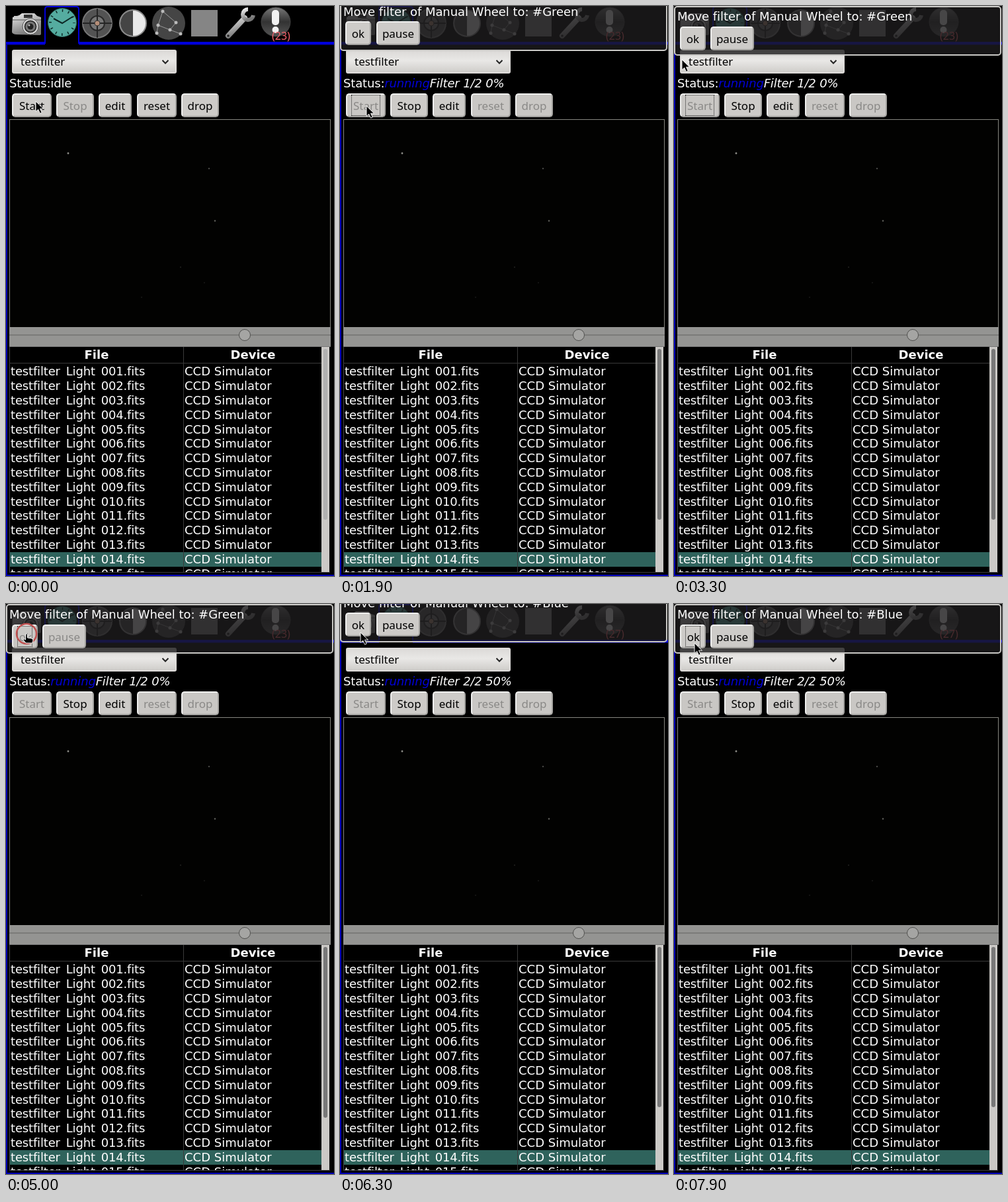
Animation of 496x861 px, one loop 8000 ms. Source, as an HTML page:

```html
<!DOCTYPE html>
<html lang="en">
<head>
<meta charset="utf-8">
<title>Filter sequence</title>
<style>
html, body { margin: 0; width: 100%; height: 100%; overflow: hidden; background: #000; }
#stage { position: relative; width: 496px; height: 861px; overflow: hidden; background: #000; color: #fff;
  font: 18px/22px "DejaVu Sans", sans-serif; white-space: pre; }
#stage div, svg { position: absolute; box-sizing: border-box; }
svg { left: 0; top: 0; overflow: visible; }
.btn, #combo { font: 17px/22px "Noto Sans", sans-serif; color: #000; }
.btn { display: flex; align-items: center; justify-content: center; padding-top: 2px; height: 36px;
  background: #cdcbc8; border: 2px solid; border-color: #efefee #a4a3a0 #a4a3a0 #efefee; border-radius: 5px; }
.btn.off { color: #8a8987; background: #c9c7c4; }
.btn.focus::after { content: ""; position: absolute; inset: 0 6px; border: 1px dotted #222; }
#combo { left: 9px; top: 66px; width: 249px; height: 36px; padding: 5px 11px; border: 2px solid #dddbd9;
  border-radius: 3px; background: linear-gradient(#dcdad8, #e9e8e6 45%, #cfcdca); }
#combo.hover { background: #efeeec; }
#frame { left: 5px; top: 171px; width: 486px; height: 315px; border: 1px solid #85857f; background: #020201; }
#slider { left: 5px; top: 485px; width: 486px; height: 30px; background: #949492; border-bottom: 1px solid #777; }
#slider::before { content: ""; position: absolute; left: 0; right: 0; top: 11px; height: 2px; background: #7b7b79; }
#knob { left: 347px; top: 3px; width: 18px; height: 18px; border-radius: 50%; background: #a5a5a3; border: 1px solid #50504e; }
#table { left: 5px; top: 515px; width: 472px; height: 340px; overflow: hidden; border-left: 1px solid #444; }
.head { top: 1px; font-weight: bold; text-align: center; }
.row { left: 0; width: 472px; height: 22px; }
.row.sel { background: #2f635c; }
.row i { visibility: hidden; font-style: normal; }
.row span { padding-left: 1px; }
.row span, #status { letter-spacing: -.16px; }
.row div { left: 264px; top: 0; }
#bar { left: 477px; top: 515px; width: 12px; height: 340px; background: #cbc9c6; }
#thumb { left: 3px; top: 3px; width: 6px; border-radius: 3px; }
#status { left: 5px; top: 106px; }
#status i { color: #0000d8; }
#dialog { left: 0; top: 0; width: 495px; height: 75px; border: 2px solid #c9c8c5; border-radius: 5px; background: rgba(29,28,29,.8); }
#msg { left: 3px; top: 3px; letter-spacing: -.05px; }
#badge { left: 402px; top: 34px; font: 500 16px/22px "Noto Sans", sans-serif; color: #f5626c; }
</style>
</head>
<body>
<div id="stage">
  <svg width="496" height="861">
    <defs>
      <linearGradient id="silver" x2=".4" y2="1"><stop stop-color="#eee"/><stop offset="1" stop-color="#777"/></linearGradient>
      <linearGradient id="dome" x2="0" y2="1"><stop stop-color="#777"/><stop offset=".5" stop-color="#333"/><stop offset="1" stop-color="#555"/></linearGradient>
      <linearGradient id="band" x2="0" y2="1"><stop stop-color="#00a"/><stop offset=".45" stop-color="#00f"/><stop offset="1" stop-color="#006"/></linearGradient>
    </defs>
    <rect id="hover" x="5" y="0" width="53" height="56" rx="4" fill="#1b1930" stroke="#35324c"/>
    <path d="M0 54H59V59H0ZM110 54H496V59H110Z" fill="url(#band)"/>
    <path d="M59 57V5Q59 1 63 1H106Q110 1 110 5V57" fill="none" stroke="#0000d8" stroke-width="2"/>
    <path d="M1 57V861M0 860H496" stroke="#0000b4" stroke-width="2"/>
    <path d="M10 17L20 14 24 11H43L47 15 53 17V42Q53 44 50 44L15 43Q9 42 9 39Z" fill="url(#silver)"/>
    <path d="M10 21H53" stroke="#555"/>
    <rect x="27" y="13" width="13" height="5" fill="#333"/>
    <rect x="12" y="15" width="7" height="3" fill="#ccc"/>
    <circle cx="37" cy="31" r="12" fill="#ddd" stroke="#555"/>
    <circle cx="37" cy="31" r="8.5" fill="#777" stroke="#333" stroke-width="2"/>
    <circle cx="37" cy="31" r="4.5" fill="#222"/><circle cx="35" cy="29" r="1.5" fill="#bbb"/>
    <circle cx="85" cy="25" r="21.5" fill="#55aca0" stroke="#28665e"/>
    <circle cx="85" cy="25" r="18" fill="none" stroke="#0c2724" stroke-width="4" stroke-dasharray="1.5 7.925" stroke-dashoffset=".75"/>
    <path d="M72 19L85 26 101 16" fill="none" stroke="#0c2724" stroke-width="2"/>
    <circle cx="138" cy="26" r="22" fill="#535353" stroke="#777" stroke-width="2"/>
    <circle cx="138" cy="26" r="11" fill="#767676" stroke="#292929" stroke-width="2"/>
    <path d="M138 4V48M116 26H160" stroke="#242424" stroke-width="2"/>
    <circle cx="138" cy="26" r="4" fill="#b58e78" stroke="#333"/>
    <circle cx="192" cy="26" r="20" fill="#e9e9e9" stroke="#888" stroke-width="2"/>
    <path d="M192 7A19 19 0 0 0 192 45Z" fill="#454545"/>
    <circle cx="246" cy="26" r="25" fill="#454545"/>
    <g fill="none" stroke="#999">
      <path d="M237 8L230 29 248 36 257 25 237 8M248 36L264 42M230 29L228 41"/>
      <path d="M237 8h0M230 29h0M248 36h0M257 25h0M264 42h0M228 41h0" stroke="#bbb" stroke-width="5" stroke-linecap="round"/>
    </g>
    <rect x="280" y="6" width="40" height="40" fill="#858585"/>
    <g fill="none" stroke="url(#silver)">
      <path d="M336 45L361 18" stroke-width="8" stroke-linecap="round"/>
      <path d="M366 5A8 8 0 1 0 374 14" stroke-width="6"/>
    </g>
    <circle cx="336" cy="45" r="1.8" fill="#222"/>
    <circle cx="408" cy="24" r="22" fill="url(#dome)" stroke="#444"/>
    <rect x="402" y="6" width="11" height="23" rx="5" fill="#f2f2f2"/><circle cx="407.5" cy="36" r="5" fill="#f2f2f2"/>
  </svg>
  <div id="badge"></div>
  <div id="combo">testfilter</div>
  <svg width="496" height="861"><path d="M236.5 82L241 86.5 245.5 82" fill="none" stroke="#222" stroke-width="2"/></svg>
  <div id="status"></div>
  <div class="btn" id="start" style="left:9px;top:132px;width:60px">Start</div>
  <div class="btn" id="stop" style="left:76px;top:132px;width:57px">Stop</div>
  <div class="btn" style="left:140px;top:132px;width:50px">edit</div>
  <div class="btn" id="reset" style="left:198px;top:132px;width:60px">reset</div>
  <div class="btn" id="drop" style="left:265px;top:132px;width:57px">drop</div>
  <div id="frame"></div>
  <svg width="496" height="861" fill="#8a8a84">
    <circle cx="94" cy="222.5" r="1.4"/><circle cx="307" cy="245.5" r="1" opacity=".75"/>
    <circle cx="316" cy="324.5" r="1.2" opacity=".7"/><circle cx="264" cy="394.5" r="1" opacity=".25"/>
    <circle cx="300" cy="418" r="1" opacity=".18"/><circle cx="205" cy="440" r="1" opacity=".18"/>
  </svg>
  <div id="slider"><div id="knob"></div></div>
  <div id="table">
    <div class="head" style="left:0;width:262px">File</div>
    <div class="head" style="left:263px;width:209px">Device</div>
  </div>
  <svg width="496" height="861"><path d="M5 539.5H477M268.5 515V855M5 855.5H490" stroke="#3a3a3a"/></svg>
  <div id="bar"><div id="thumb"></div></div>
  <div id="dialog">
    <div id="msg"></div>
    <div class="btn" id="ok" style="left:7px;top:29px;width:39px">ok</div>
    <div class="btn" id="pause" style="left:53px;top:29px;width:66px">pause</div>
  </div>
  <svg width="496" height="861">
    <circle id="ring" cx="31" cy="45" r="15" fill="none" stroke="#c0504f" stroke-width="2.5"/>
    <g id="cursor" fill="#000" stroke="#fff" stroke-linejoin="round">
      <path id="arrow" d="M0 0V15.5L3.7 12.2 6.5 18.3 9.2 17 6.5 11.2H11.5Z" stroke-width=".9"/>
      <path id="hand" d="M-1 0Q1-1 1.5 1V6L8 7Q10 7.5 10 10L9 14H-1L-5 9Q-5 7-3 8L-1.5 9Z"/>
    </g>
  </svg>
</div>
<script>
const $ = id => document.getElementById(id);
const LOOP = 8000, HIDDEN = -76;

for (let i = 0; i < 15; i++) {
  const row = document.createElement('div');
  row.className = i === 13 ? 'row sel' : 'row';
  row.style.top = 26 + Math.ceil(i * 21.8) + 'px';
  row.innerHTML = `<span>testfilter<i>_</i>Light<i>_</i>${String(i + 1).padStart(3, '0')}.fits</span><div>CCD Simulator</div>`;
  $('table').append(row);
}

// pointer tip: time, x, y
const path = [
  [0, 45, 144], [400, 44, 150], [500, 43, 157], [600, 42, 161], [700, 41, 158], [800, 40, 154], [900, 40, 151],
  [2300, 38, 147], [2400, 36, 139], [3100, 26, 120], [3200, 16, 100], [3300, 12, 81], [3400, 13, 67],
  [3600, 18, 58], [3700, 26, 48], [3800, 31, 43], [6900, 31, 47], [7000, 31, 53], [7100, 31, 60],
  [7200, 31, 62], [7700, 31, 59]
];

const clamp = v => Math.max(0, Math.min(1, v));
const easeOut = p => 1 - (1 - clamp(p)) ** 2;
const slideIn = age => HIDDEN * (1 - easeOut((age + 20) / 600));
const show = (id, on) => $(id).style.display = on ? '' : 'none';
const put = (id, text) => { if ($(id).innerHTML !== text) $(id).innerHTML = text; };

function dialogY(t) {
  if (t < 1500) return HIDDEN;
  if (t < 5000) return slideIn(t - 1500);
  if (t < 6000) return HIDDEN * clamp((t - 5000) / 400) ** 1.5;
  return slideIn(t - 6000);
}

function render(t) {
  const between = (a, b) => t >= a && t < b;
  const running = t >= 1200, second = t >= 6000;
  const flag = (id, name, on) => $(id).classList.toggle(name, on);

  const step = second ? 'Filter 2/2 50%' : t >= 5200 ? 'Light 1/2 0%' : 'Filter 1/2 0%';
  put('status', running ? `Status:<i>running</i><em>${step}</em>` : 'Status:idle');
  put('badge', second ? '(27)' : t >= 5200 ? '(25)' : '(23)');
  put('msg', 'Move filter of Manual Wheel to: #' + (second ? 'Blue' : 'Green'));

  for (const id of ['start', 'reset', 'drop']) flag(id, 'off', running);
  flag('stop', 'off', !running);
  flag('start', 'focus', between(1100, 4400));
  flag('combo', 'hover', between(3100, 3300));
  const shade = 176 - 56 * clamp((t - 1000) / 300);
  $('thumb').style.background = `rgb(${shade},${shade},${shade})`;
  $('thumb').style.height = (second ? 242 : 258) + 'px';

  $('dialog').style.transform = `translateY(${Math.round(dialogY(t))}px)`;
  const moving = between(1500, 2300) || between(6000, 6900);
  $('ok').style.transform = moving ? 'translate(-1px,-1px)' : '';
  $('pause').style.transform = moving ? 'translateY(-1px)' : '';
  const pressed = between(4400, 6000) || t >= 7900;
  flag('ok', 'focus', pressed);
  $('ok').style.paddingLeft = pressed ? '2px' : '';
  for (const id of ['ok', 'pause']) flag(id, 'off', between(4900, 6000));

  show('ring', between(4900, 5200));
  show('hover', between(5300, 6200));
  const hand = between(4900, 6200);
  show('hand', hand);
  show('arrow', !hand);
  const [, x, y] = path.findLast(p => p[0] <= t);
  $('cursor').setAttribute('transform', `translate(${x} ${hand ? y + 2 : y})`);
}

const begin = performance.now();
function tick() {
  const t = (performance.now() - begin) % LOOP;
  render(Math.floor(t / 100) * 100);
  requestAnimationFrame(tick);
}
tick();
</script>
</body>
</html>
```
